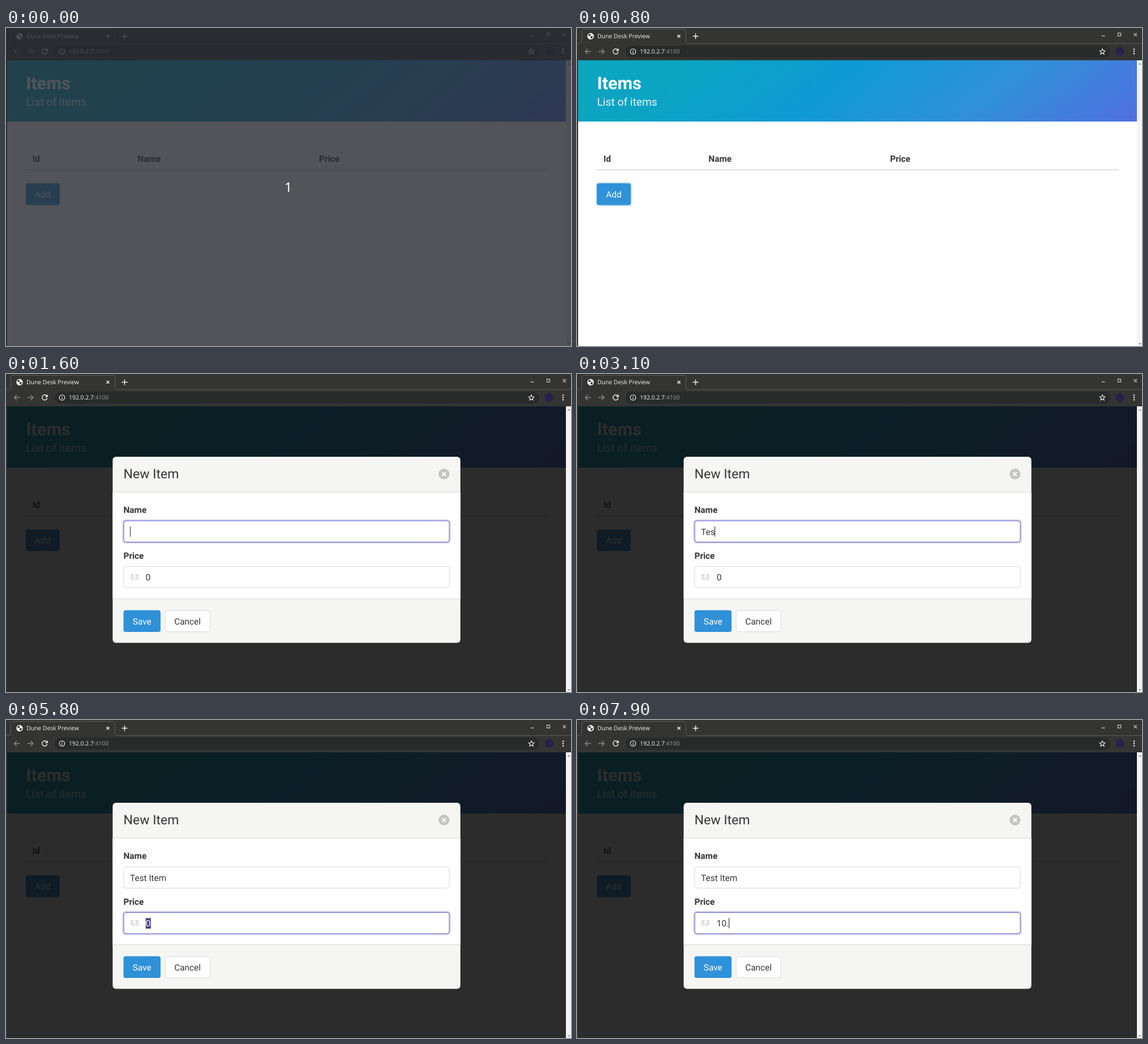
Recreate the animation shown at these times as an HTML page. Size 998 px wide and 561 px high, loop 8 s.

```html
<!DOCTYPE html>
<html lang="en">
<head>
<meta charset="utf-8">
<title>Item form</title>
<style>
  html, body { margin: 0; width: 100%; height: 100%; overflow: hidden; background: #343533; }
  svg { display: block; width: 998px; height: 561px; }
  text { font-family: Roboto, sans-serif; font-size: 15.36px; fill: #363636; white-space: pre; text-rendering: geometricPrecision; }
  .bold { font-weight: 700; }
  .mid { text-anchor: middle; }
  .white { fill: #fff; }
  .ui { font-family: "Open Sans", "Noto Sans", sans-serif; font-size: 10.4px; fill: #f2f2f0; }
  .line { fill: none; stroke: #f2f2f0; stroke-width: 1.4; }
  .field { fill: #fff; stroke: #dbdbdb; }
  .field.hover { stroke: #b5b5b5; }
  .field.focus { stroke: #5552c2; }
  .glow { fill: none; stroke: #5552c2; stroke-opacity: .25; stroke-width: 2; }
</style>
</head>
<body>
<svg viewBox="0 0 998 561">
  <defs>
    <linearGradient id="sky" gradientUnits="userSpaceOnUse" x1="273.5" y1="-163" x2="717.5" y2="385">
      <stop offset="0" stop-color="#0ca5bf"/>
      <stop offset=".22" stop-color="#0ca3c4"/>
      <stop offset=".44" stop-color="#0d9bd4"/>
      <stop offset=".71" stop-color="#2f91d8"/>
      <stop offset="1" stop-color="#506fe0"/>
    </linearGradient>
  </defs>

  <!-- browser window -->
  <rect width="998" height="561" fill="#343533"/>
  <path d="M0 27.5H4Q8.5 27.5 8.5 23V6Q8.5 2.5 12 2.5H188Q192.500 2.500 192.500 6V23Q192.500 27.500 197 27.500H998" fill="none" stroke="#5b5c5a"/>
  <circle cx="24" cy="14.5" r="5.7" fill="#f2f2f0"/>
  <path d="M20 11.5l3-1 2 1.5-2 2h-2zM24 15l3-1 1 2-3 3-1-2z" fill="#343533"/>
  <text class="ui" x="36" y="18.3">Dune Desk Preview</text>
  <path class="line" d="M177.5 12l5 5m0-5l-5 5M204.5 14.5h10m-5-5v10"/>
  <path class="line" style="stroke:#b4b4b2" d="M926.5 14h6M955.5 9h5v5h-5zM983.5 9l5.5 5.5m0-5.5l-5.5 5.5"/>
  <path class="line" style="stroke:#888987" d="M24.5 41.5H14.5m4.5-4.5l-4.5 4.5 4.5 4.5M38 41.5H48m-4.5-4.5l4.5 4.5-4.5 4.5"/>
  <path class="line" d="M72.3 39A4.6 4.6 0 1 0 72.8 42.5M73 36.5V40h-3.7"/>
  <rect x="86" y="31" width="856" height="21.5" rx="10.7" fill="#292b2b"/>
  <circle class="line" cx="99" cy="41.5" r="4.8" style="stroke-width:1.1"/>
  <path class="line" d="M99 38.5v1.2m0 1.3v3.5" style="stroke-width:1.2"/>
  <text class="ui" x="111" y="45.2">192.0.2.7<tspan fill="#999b99">:4100</tspan></text>
  <path class="line" style="stroke-width:1.1" d="M928 36.8l1.4 3.2 3.5.3-2.7 2.3.8 3.4-3-1.8-3 1.8.8-3.4-2.7-2.3 3.5-.3z"/>
  <circle cx="959" cy="41.5" r="7.7" fill="#29214a"/>
  <g fill="#f2f2f0"><circle cx="984" cy="37.5" r="1.3"/><circle cx="984" cy="41.5" r="1.3"/><circle cx="984" cy="45.5" r="1.3"/></g>

  <!-- page -->
  <rect x="2" y="57" width="987" height="504" fill="#fefefe"/>
  <rect x="989" y="57" width="9" height="504" fill="#f3f3f3"/>
  <path d="M991.5 64.5l2.8-3 2.8 3zM991.5 556l2.8 3 2.8-3z" fill="#9b9b9b"/>
  <rect x="2" y="57" width="987" height="108" fill="url(#sky)"/>
  <text class="bold white" x="35.5" y="107.5" style="font-size:30.72px">Items</text>
  <text class="white" x="35.5" y="136.5" style="font-size:19.2px" fill-opacity=".9">List of items</text>
  <text class="bold" x="46.8" y="235.5">Id</text>
  <text class="bold" x="232.3" y="235.5">Name</text>
  <text class="bold" x="553" y="235.5">Price</text>
  <rect x="35" y="249.2" width="921" height="1.8" fill="#dbdbdb"/>
  <rect x="35" y="274" width="60" height="38.4" rx="3.84" fill="#2f91d8"/>
  <rect id="pressed" x="34" y="273" width="62" height="40.4" rx="4.8" fill="none" stroke="#2f91d8" stroke-opacity=".25" stroke-width="2"/>
  <text class="mid white" x="65" y="298.5">Add</text>

  <!-- dialog -->
  <g id="dialog">
    <rect x="2" y="57" width="987" height="504" fill="#0a0a0a" fill-opacity=".86"/>
    <rect x="188.4" y="146" width="614.2" height="328.3" rx="5.76" fill="#f5f5f4"/>
    <path d="M188.4 208.5h614.2M188.4 396.5h614.2" stroke="#dbdbdb"/>
    <rect x="188.4" y="209" width="614.2" height="187" fill="#fefefe"/>
    <text x="207.5" y="184.3" style="font-size:23.04px">New Item</text>
    <circle cx="773.7" cy="176.5" r="9.6" fill="#c5c5c4"/>
    <path d="M770.4 173.2l6.6 6.6m0-6.6l-6.6 6.6" stroke="#fff" stroke-width="2"/>
    <text class="bold" x="207.5" y="245">Name</text>
    <text class="bold" x="207.5" y="325.5">Price</text>
    <g id="fields"></g>
    <path d="M220 353h14v8h-14zM220 362h14v1.2h-14z" fill="#dbdbdb"/>
    <path d="M221.5 355.5v3M232.5 355.5v3" stroke="#fff"/>
    <ellipse cx="227" cy="357" rx="3" ry="3.4" fill="#fff"/>
    <path d="M227 355v4" stroke="#dbdbdb" stroke-width="1.5"/>
    <rect x="207.5" y="416.7" width="65.5" height="38.4" rx="3.84" fill="#2f91d8"/>
    <text class="mid white" x="240.3" y="441.5">Save</text>
    <rect x="281.2" y="417.2" width="79" height="37.4" rx="3.84" fill="#fff" stroke="#dbdbdb"/>
    <text class="mid" x="320.6" y="441.5">Cancel</text>
  </g>

  <!-- countdown -->
  <g id="countdown">
    <rect width="998" height="561" fill="#272a30" fill-opacity=".8"/>
    <text class="mid white" x="498.5" y="289" style="font-family:'Noto Sans','Open Sans',sans-serif;font-size:23px">1</text>
  </g>
</svg>
<script>
const LOOP = 8000;
const $ = id => document.getElementById(id);
const show = (el, on) => el.style.display = on ? '' : 'none';

function add(parent, tag, attrs) {
  const el = document.createElementNS('http://www.w3.org/2000/svg', tag);
  for (const key in attrs) el.setAttribute(key, attrs[key]);
  return parent.appendChild(el);
}

function makeField(x, y) {
  const g = $('fields');
  const glow = add(g, 'rect', {class: 'glow', x: 206.5, y: y - 1.5, width: 578, height: 40.5, rx: 4.8});
  const box = add(g, 'rect', {class: 'field', x: 208, y, width: 575, height: 37.5, rx: 3.84});
  const mark = add(g, 'rect', {x, y: y + 10, width: 9, height: 18.5, fill: '#4b3a86'});
  const text = add(g, 'text', {x, y: y + 24.5});
  const caret = add(g, 'rect', {y: y + 10, width: 1, height: 18, fill: '#222'});
  return (value, {hover, focus, selected, caretOn}) => {
    box.setAttribute('class', 'field' + (focus ? ' focus' : hover ? ' hover' : ''));
    text.textContent = value;
    text.setAttribute('class', selected ? 'white' : '');
    show(glow, focus);
    show(mark, selected);
    show(caret, focus && caretOn);
    caret.setAttribute('x', Math.floor(x + (value ? text.getComputedTextLength() : 0)));
  };
}

const drawName = makeField(219.1, 259);
const drawPrice = makeField(246.8, 339.5);
const nameKeys = [2600, 2900, 3100, 3500, 3600, 4100, 4300, 4400, 4500];
const priceKeys = [6300, 6400, 6700];

const typed = (keys, t) => keys.filter(k => k <= t).length;
// The caret restarts its blink at focus and at every key press.
function blink(keys, start, period, t) {
  const last = Math.max(start, ...keys.filter(k => k <= t));
  return Math.floor((t - last) / period) % 2 === 0;
}

function render(t) {
  show($('countdown'), t < 300);
  show($('pressed'), t >= 800 && t < 1600);
  show($('dialog'), t >= 900);
  if (t < 900) return;
  drawName('Test Item'.slice(0, typed(nameKeys, t)), {
    hover: t >= 1200 && t < 1600,
    focus: t >= 1600 && t < 5300,
    selected: false,
    caretOn: blink(nameKeys, 1600, 500, t)
  });
  const selected = t >= 5800 && t < 6300;
  drawPrice('10.'.slice(0, typed(priceKeys, t)) || '0', {
    hover: t >= 5200 && t < 5300,
    focus: t >= 5300,
    selected,
    caretOn: !selected && blink(priceKeys, 5300, 600, t)
  });
}

const start = performance.now();
function tick() {
  render((performance.now() - start) % LOOP);
  requestAnimationFrame(tick);
}
tick();
</script>
</body>
</html>
```
